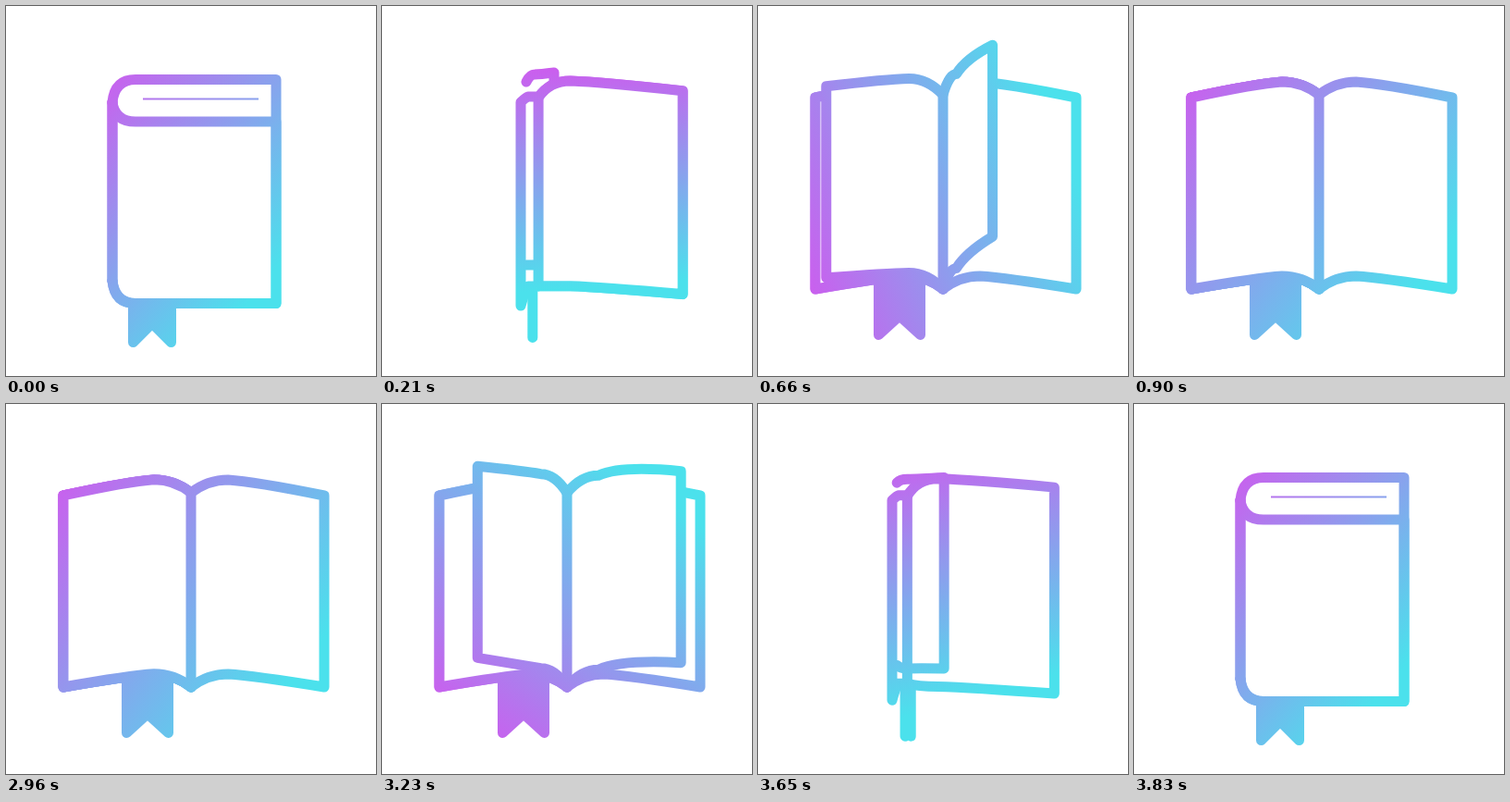
Recreate the animation shown at these times as an HTML page with a canvas. Size 400 px wide and 400 px high, loop 4.86 s.

```html
<!DOCTYPE html>
<html lang="en">
<head>
<meta charset="utf-8">
<title>Book</title>
<style>
  html, body { margin: 0; width: 100%; height: 100%; overflow: hidden; background: #fff; }
  canvas { display: block; width: 100%; height: 100%; }
</style>
</head>
<body>
<canvas width="400" height="400"></canvas>
<script>
const ctx = document.querySelector('canvas').getContext('2d');
const LOOP = 4860, STEP = 30, OPEN = 900, CLOSE_AT = 2930;
const SWING = 210, UNFOLDED = 330;

const mix = (a, b, k) => a + (b - a) * k;
const blend = (a, b, k) => a.map((v, i) => mix(v, b[i], k));
const clamp = v => Math.min(1, Math.max(0, v));
const ease = k => (1 - Math.cos(Math.PI * clamp(k))) / 2;

// Top edge from hinge over knee to outer corner, then the heights at these three.
function page([hx, hy], [kx, ky], [ex, ey], heights, curl = 0.45, bulge = 0) {
  return [
    hx, hy,
    mix(hx, kx, curl), ky,
    kx, ky,
    mix(kx, ex, 0.27), mix(ky, ey, 0.1) - bulge,
    ex, ey,
    ...heights
  ];
}

const closedPage = top =>
  page([115, 104], [140, top], [292, top], [193, 321.5 - top, 321.5 - top], 0.1);

// A leaf of the open book: angle 0 lies right, PI lies left.
function leaf(angle) {
  const cos = Math.cos(angle), sin = Math.sin(angle);
  const edgeY = 99 - 60 * Math.max(0, sin) ** 1.5 - 4 * Math.sin(2 * angle);
  return page([200, 96], [200 + 40 * cos, 82 - 9 * sin], [203 + 141 * cos, edgeY],
    [210, 210, 207], 0.45, 11 * sin * (1 + cos));
}

const closedBack = closedPage(79.5);
const spine = page([115, 104], [115, 104], [115, 104], [193, 193, 193]);
const coverSwing = page([168, 98], [158, 98], [150, 104], [205, 205, 220]);
const frontSwing = page([156, 82], [165, 74], [186, 72], [198, 206, 208]);

const cover = [[0, spine], [SWING, coverSwing], [UNFOLDED, leaf(Math.PI)]];
const front = [[0, closedPage(125)], [SWING, frontSwing], [360, leaf(2.04)], [480, leaf(Math.PI)]];
const turns = [{ start: 190, length: 615 }, { start: 490, length: 400 }];

function sample(keys, t) {
  const next = keys.findIndex(key => key[0] > t);
  if (next < 0) return keys[keys.length - 1][1];
  const [t0, a] = keys[next - 1], [t1, b] = keys[next];
  return blend(a, b, (t - t0) / (t1 - t0));
}

function drawPage(p, filled = true) {
  const [hx, hy, ax, ay, kx, ky, bx, by, ex, ey, hinge, knee, edge] = p;
  ctx.beginPath();
  ctx.moveTo(hx, hy);
  ctx.quadraticCurveTo(ax, ay, kx, ky);
  ctx.quadraticCurveTo(bx, by, ex, ey);
  ctx.lineTo(ex, ey + edge);
  ctx.quadraticCurveTo(bx, by + knee, kx, ky + knee);
  ctx.quadraticCurveTo(ax, ay + knee, hx, hy + hinge);
  if (filled) {
    ctx.fillStyle = '#fff';
    ctx.fill();
  }
  ctx.stroke();
}

function drawLine(x1, y1, x2, y2) {
  ctx.beginPath();
  ctx.moveTo(x1, y1);
  ctx.lineTo(x2, y2);
  ctx.stroke();
}

// The ribbon narrows to a line and widens again as the cover swings over.
function drawRibbon(t, unfold, paint) {
  const width = t < SWING ? 1 - t / SWING : clamp((t - SWING) / (UNFOLDED - SWING));
  const half = width * mix(20.5, 22.5, unfold);
  const x = mix(158, 153, unfold) + 8 * (1 - width);
  const top = mix(322, 296, unfold), tail = mix(363.5, 355.5, unfold);
  ctx.beginPath();
  ctx.moveTo(x - half, top);
  ctx.lineTo(x - half, tail);
  ctx.lineTo(x, tail - 20.5);
  ctx.lineTo(x + half, tail);
  ctx.lineTo(x + half, top);
  ctx.closePath();
  ctx.fillStyle = paint;
  ctx.fill();
  ctx.stroke();
}

// The gradient makes one full turn while the book opens.
function gradientAt(t, unfold) {
  const angle = mix(40, 398, ease(t / OPEN)) * Math.PI / 180;
  const cx = 203, cy = mix(205, 200, unfold);
  const cos = Math.cos(angle), sin = Math.sin(angle);
  const reach = Math.abs(cos) * mix(94, 144, unfold) + Math.abs(sin) * mix(132, 125, unfold);
  const dx = cos * reach, dy = sin * reach;
  const gradient = ctx.createLinearGradient(cx - dx, cy - dy, cx + dx, cy + dy);
  gradient.addColorStop(0, '#cb5eee');
  gradient.addColorStop(0.88, '#4be1ec');
  return gradient;
}

function draw(t) {
  const unfold = clamp(t / UNFOLDED);
  const paint = gradientAt(t, unfold);
  ctx.clearRect(0, 0, 400, 400);
  ctx.strokeStyle = paint;
  ctx.lineWidth = 11;
  ctx.lineCap = ctx.lineJoin = 'round';

  drawRibbon(t, unfold, paint);
  const back = blend(closedBack, leaf(0), unfold);
  drawPage(back);
  drawPage(sample(cover, t), t > 0);
  drawPage(sample(front, t), t > SWING);
  for (const { start, length } of turns) {
    const turned = ease((t - start) / length);
    if (turned > 0) drawPage(blend(closedBack, leaf(Math.PI * turned), unfold));
  }
  const [x, y] = back;
  drawLine(x, y, x, y + back[10]);

  if (t < 120) {
    ctx.lineWidth = 2;
    ctx.lineCap = 'butt';
    drawLine(148, 100.5, mix(273, 148, t / 120), 100.5);
  }
}

// Opening and closing both advance in steps; closing runs the opening backwards.
function progress(time) {
  const closing = time >= CLOSE_AT;
  const elapsed = closing ? time - CLOSE_AT : time;
  const stepped = Math.min(OPEN, Math.floor(elapsed / STEP) * STEP);
  return closing ? OPEN - stepped : stepped;
}

const start = performance.now();
function tick() {
  draw(progress((performance.now() - start) % LOOP));
  requestAnimationFrame(tick);
}
tick();
</script>
</body>
</html>
```
